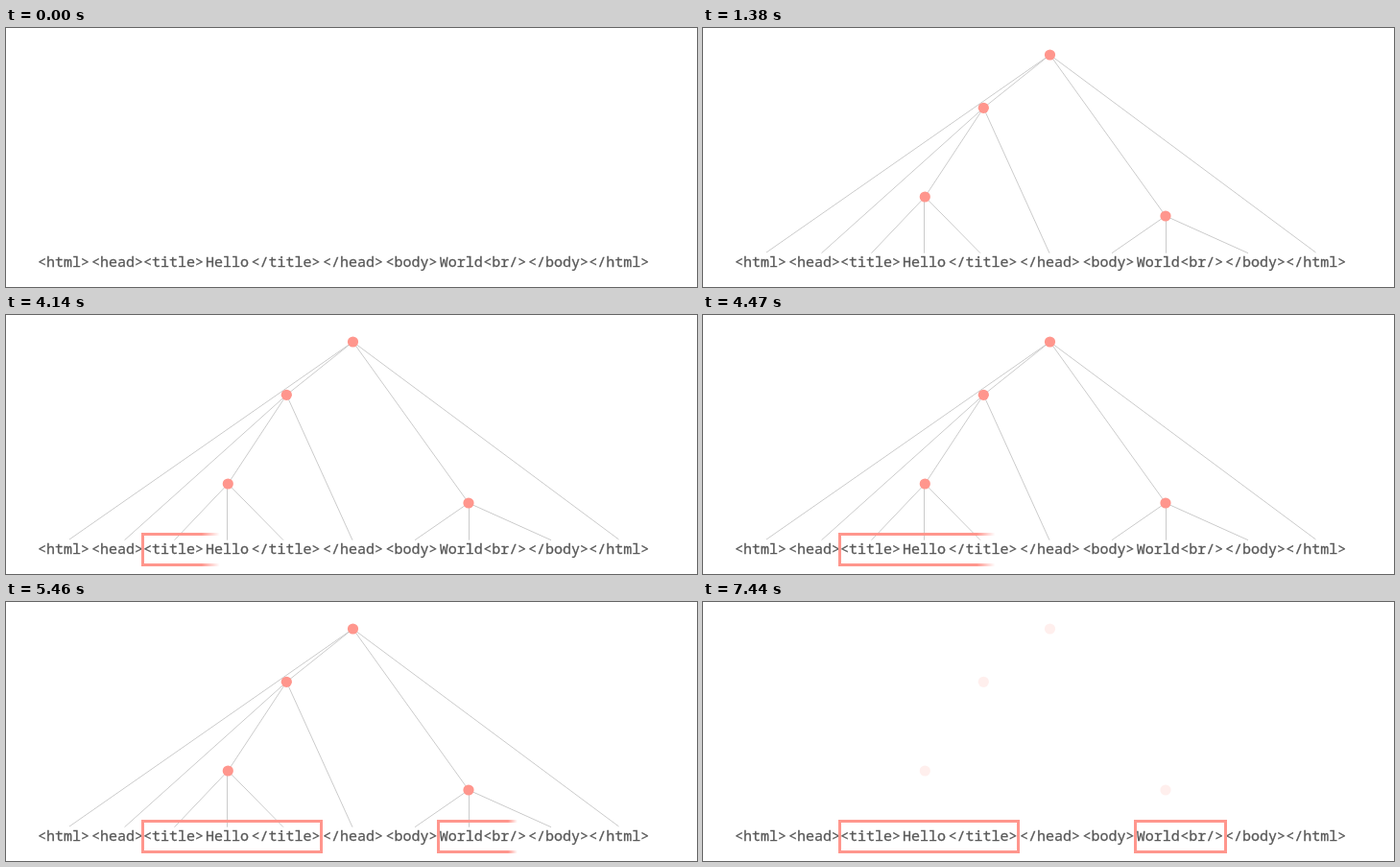
An HTML page with a canvas for the animation above (8000 ms loop, 720x270 px).

```html
<!DOCTYPE html>
<html lang="en">
<head>
<meta charset="utf-8">
<title>Markup tree</title>
<style>
  html, body { margin: 0; width: 720px; height: 270px; overflow: hidden; background: #fff; }
  canvas { display: block; }
</style>
</head>
<body>
<canvas id="stage" width="720" height="270"></canvas>
<script>
const WIDTH = 720, HEIGHT = 270, LOOP = 8000, STEP = 30;
const CORAL = '#ff968d', LINE = '#cbcbcb', INK = '#585858';
const FAINT = 0.15;

const ctx = document.getElementById('stage').getContext('2d');
const layer = document.createElement('canvas');
layer.width = WIDTH;
layer.height = HEIGHT;
const lctx = layer.getContext('2d');

const tokens = [
  ['<html>', 33], ['<head>', 89], ['<title>', 143], ['Hello', 208],
  ['</title>', 255.5], ['</head>', 330], ['<body>', 395.5], ['World', 451.7],
  ['<br/>', 497.3], ['</body>', 544], ['</html>', 607.2]
];

const root = [361.5, 28], head = [292.3, 83.3], title = [231.3, 176], body = [482, 196];
const nodes = [root, head, title, body];
const leaf = (x, y = 234.7) => [x, y];
const edges = [
  [root, leaf(66, 234)], [root, head], [root, body], [root, leaf(638.5, 234)],
  [head, leaf(123.5)], [head, title], [head, leaf(361)],
  [title, leaf(175.5)], [[230.5, 176], leaf(230.5)], [title, leaf(289)],
  [body, leaf(426)], [[482.5, 196], leaf(482.5)], [body, leaf(568)]
];

const treeWipe = { start: 150, length: 1230, x: 66, width: 572 };
const frames = [
  { start: 3810, length: 840, x: 141, width: 189 },
  { start: 4800, length: 840, x: 449, width: 97 }
];

const clamp = v => Math.min(1, Math.max(0, v));
const smooth = p => p * p * (3 - 2 * p);

// Reveals a drawing from left to right behind a soft edge.
function reveal(wipe, t, opacity, draw) {
  const p = clamp((t - wipe.start) / wipe.length);
  if (p === 0) return;
  lctx.clearRect(0, 0, WIDTH, HEIGHT);
  draw(lctx);
  if (p < 1) {
    const band = wipe.width * 0.1;
    const front = wipe.x + p * (wipe.width + band);
    const mask = lctx.createLinearGradient(front - band, 0, front, 0);
    mask.addColorStop(0, 'rgba(0,0,0,1)');
    mask.addColorStop(1, 'rgba(0,0,0,0)');
    lctx.save();
    lctx.globalCompositeOperation = 'destination-in';
    lctx.fillStyle = mask;
    lctx.fillRect(0, 0, WIDTH, HEIGHT);
    lctx.restore();
  }
  ctx.globalAlpha = opacity;
  ctx.drawImage(layer, 0, 0);
  ctx.globalAlpha = 1;
}

function drawTree(c, lineAlpha) {
  c.strokeStyle = LINE;
  c.lineWidth = 1;
  c.globalAlpha = lineAlpha;
  c.beginPath();
  for (const [from, to] of edges) {
    c.moveTo(...from);
    c.lineTo(...to);
  }
  c.stroke();
  c.globalAlpha = 1;
  c.fillStyle = CORAL;
  for (const [x, y] of nodes) {
    c.beginPath();
    c.arc(x, y, 5.6, 0, Math.PI * 2);
    c.fill();
  }
}

function drawFrame(c, { x, width }) {
  c.strokeStyle = CORAL;
  c.lineWidth = 3;
  c.strokeRect(x + 1.5, 228.5, width - 3, 32);
}

// A hairline outline gives the regular weight a medium look.
function drawText() {
  ctx.font = '15px "Noto Sans Mono", "DejaVu Sans Mono", monospace';
  ctx.fillStyle = ctx.strokeStyle = INK;
  ctx.lineWidth = 0.3;
  for (const [text, x] of tokens) {
    ctx.fillText(text, x, 249);
    ctx.strokeText(text, x, 249);
  }
}

function render(t) {
  ctx.fillStyle = '#fff';
  ctx.fillRect(0, 0, WIDTH, HEIGHT);

  const opacity = Math.max(FAINT, 1 - smooth(clamp((t - 6480) / 1200)));
  reveal(treeWipe, t, opacity, c => drawTree(c, clamp((opacity - FAINT) / 0.1)));
  drawText();
  for (const frame of frames) reveal(frame, t, 1, c => drawFrame(c, frame));
}

const origin = performance.now();
function tick() {
  const t = (performance.now() - origin) % LOOP;
  render(Math.floor(t / STEP) * STEP);
  requestAnimationFrame(tick);
}
tick();
</script>
</body>
</html>
```
